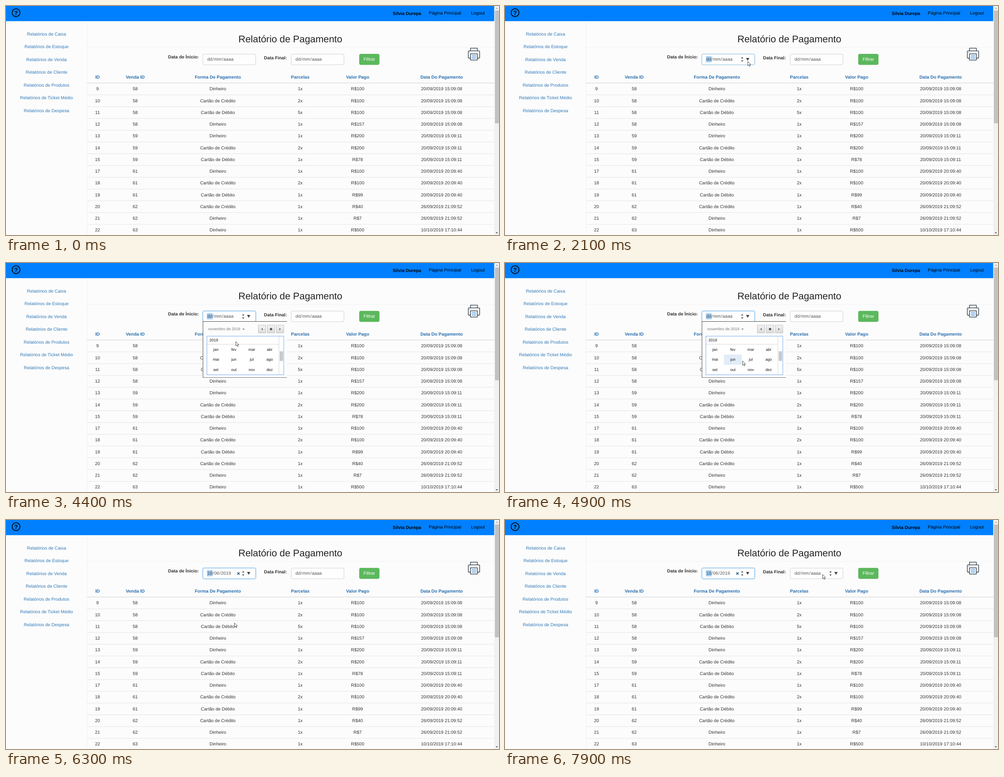
Recreate the animation shown at these times as an HTML page. Size 1095 by 511 pixels, loop 8 s.

```html
<!DOCTYPE html>
<html lang="pt-BR">
<head>
<meta charset="utf-8">
<title>Relatório de Pagamento</title>
<style>
  html, body { margin: 0; width: 100%; height: 100%; overflow: hidden; background: #fcfcfc; }
  svg { display: block; width: 1095px; height: 511px; }
  text { font: 9.98px "Liberation Sans", Arial, sans-serif; fill: #333; text-rendering: geometricPrecision; white-space: pre; }
  .mid { text-anchor: middle; }
  .bold { font-weight: bold; }
  .link { fill: #337ab7; }
  .head { fill: #2a6fb0; font-weight: bold; }
  .black { fill: #000; }
  .title { font-size: 21.4px; fill: #222; }
  .field { fill: #555; }
  .small { font-size: 8.56px; fill: #111; }
  .dim { fill: #b8b8b8; }
  .gray { fill: #777; }
  .input { fill: #fefefe; stroke: #ccc; stroke-width: .9; }
</style>
</head>
<body>
<svg viewBox="0 0 1095 511">
  <defs>
    <linearGradient id="button" x2="0" y2="1">
      <stop stop-color="#f4f4f4"/><stop offset="1" stop-color="#dadada"/>
    </linearGradient>
  </defs>
  <g id="page"></g>
  <g id="fields"></g>
  <g id="popup"></g>
  <path id="cursor" d="M0 0V9.4L2.2 7.4L3.8 10.9L5.3 10.2L3.8 6.9H6.7Z" fill="#fff" stroke="#222" stroke-width=".8"/>
</svg>
<script>
const LOOP = 8000, STEP = 100;
const $ = id => document.getElementById(id);
const text = (x, y, s, cls = '') => `<text x="${x}" y="${y}" class="${cls}">${s}</text>`;
const rect = (x, y, w, h, fill, extra = '') => `<rect x="${x}" y="${y}" width="${w}" height="${h}" fill="${fill}" ${extra}/>`;
const path = (d, fill, extra = '') => `<path d="${d}" fill="${fill}" ${extra}/>`;
const line = (d, color, width = .8) => path(d, 'none', `stroke="${color}" stroke-width="${width}"`);
const frame = (x, y, w, h, color) => rect(x, y, w, h, 'none', `stroke="${color}" stroke-width=".9"`);

// Static page
const columns = [203.3, 287, 470.5, 653.5, 781, 967.5];
const headings = ['ID', 'Venda ID', 'Forma De Pagamento', 'Parcelas', 'Valor Pago', 'Data Do Pagamento'];
const methods = { D: 'Dinheiro', C: 'Cartão de Crédito', B: 'Cartão de Débito' };
const sales = {
  58: '20/09/2019 15:09:08', 59: '20/09/2019 15:09:11', 61: '20/09/2019 20:09:40',
  62: '26/09/2019 21:09:52', 63: '10/10/2019 17:10:44'
};
const payments = `9 58 D 1 100|10 58 C 2 100|11 58 B 5 100|12 58 D 1 157|13 59 D 1 200|14 59 C 2 200|15 59 B 1 78
|17 61 D 1 100|18 61 C 2 100|19 61 B 1 99|20 62 C 1 40|21 62 D 1 7|22 63 D 1 500`.split('|');
const reports = ['Caixa', 'Estoque', 'Venda', 'Cliente', 'Produtos', 'Ticket Médio', 'Despesa'];

function printer() {
  const ink = 'stroke="#26323d" stroke-width="1.3" stroke-linejoin="round"';
  return rect(1031.6, 94.1, 15.3, 8, '#fcfcfc', ink) +
    rect(1026.8, 100.2, 25.2, 16.3, '#fcfcfc', ink + ' rx="2"') +
    rect(1031.6, 106.6, 15.3, 14, '#fcfcfc', ink) +
    line('M1034.5 110.3h9.8M1034.5 113.6h9.8M1034.5 116.9h9.8', '#3c8fe0', 1.3) +
    line('M1029 103.5h2.2', '#3c8fe0', 1.2);
}

function page() {
  let out = rect(0, 0, 1084.6, 33.8, '#0080ff') +
    '<circle cx="22.3" cy="14.9" r="8.8" fill="none" stroke="#000" stroke-width="1.7"/>' +
    `<text x="22.3" y="19.6" class="mid bold black" style="font-size:13px">?</text>` +
    text(859, 20, 'Silvia Durepa', 'bold black') +
    text(939, 19, 'Página Principal', 'black') + text(1033, 19, 'Logout', 'black') +
    line('M180 34V511', '#eee') + line('M180 92H1085', '#eee');
  reports.forEach((r, i) => out += text(90, 65.6 + i * 28.57, 'Relatórios de ' + r, 'mid link'));
  out += text(631.6, 81, 'Relatório de Pagamento', 'mid title') +
    text(360, 117.3, 'Data de Ínicio:', 'bold') + text(573, 118.6, 'Data Final:', 'bold') +
    rect(785, 107.3, 44, 23.6, '#5cb85c', 'rx="2.8" stroke="#4cae4c" stroke-width=".8"') +
    '<text x="807" y="122.3" class="mid" style="fill:#fff">Filtrar</text>' + printer();
  headings.forEach((h, i) => out += text(columns[i], 161.6, h, 'mid head'));
  out += line('M180 171.7H1085', '#ddd', 1.4);
  payments.forEach((p, row) => {
    const [id, sale, method, parts, value] = p.trim().split(' ');
    const y = 188.4 + row * 26.25;
    [id, sale, methods[method], parts + 'x', 'R$' + value, sales[sale]]
      .forEach((s, i) => out += text(columns[i], y, s, 'mid'));
    out += line(`M180 ${y + 10}H1085`, '#ddd');
  });
  return out + rect(1084.6, 0, 10.4, 511, '#f1f1f1') + rect(1086, 10, 8.8, 251.6, '#c1c1c1') +
    path('M1087.6 6.2h5l-2.5-2.7z', '#a3a3a3') + path('M1087.6 505h5l-2.5 2.7z', '#505050');
}

// Date inputs
function dateInput(x, value, focus, controls) {
  const glow = focus ? ` style="stroke:rgb(${204 - 102 * focus},${204 - 29 * focus},${204 + 29 * focus});` +
    `filter:drop-shadow(0 0 1.8px rgba(102,175,233,${.6 * focus}))"` : '';
  let out = `<rect x="${x}" y="107.3" width="117.3" height="23.7" rx="2.8" class="input"${glow}/>`;
  if (focus) out += rect(x + 8.9, 112.3, 12.7, 13.2, '#9fcbf3');
  out += `<text x="${x + 9.7}" y="122.3" dx="0 0 .7 .7 0 .7 .7" class="field">${value}</text>`;
  if (controls) out += path(`M${x + 87} 117h5.2l-2.6-3zM${x + 87} 121.4h5.2l-2.6 3z`, '#444') +
    path(`M${x + 98} 116h7.4l-3.7 6.3z`, '#444');
  if (value[0] == '1') out += line(`M${x + 76.4} 116.7l5.2 5.2m0-5.2l-5.2 5.2`, '#1d5a86', 1.5);
  return out;
}

// Calendar popup
const weekdays = ['dom', 'seg', 'ter', 'qua', 'qui', 'sex', 'sáb'];
const months = ['jan', 'fev', 'mar', 'abr', 'mai', 'jun', 'jul', 'ago', 'set', 'out', 'nov', 'dez'];
const DAY = { x: 446.4, y: 181.3, w: 24.28, h: 14.25, cols: 7 };
const MONTH = { x: 446.4, y: 181.5, w: 39.8, h: 22.8, cols: 4 };
const cellAt = (g, i) => [g.x + i % g.cols * g.w, g.y + Math.floor(i / g.cols) * g.h];
function hitCell(g, count, x, y) {
  const col = Math.floor((x - g.x) / g.w), row = Math.floor((y - g.y) / g.h);
  const i = row * g.cols + col;
  return col < 0 || col >= g.cols || row < 0 || i >= count ? -1 : i;
}
function cells(grid, list, hover) {
  return list.map(([label, cls], i) => {
    const [x, y] = cellAt(grid, i);
    return (i == hover ? rect(x, y, grid.w, grid.h, '#e2ecf8') : '') +
      text(x + grid.w / 2, y + grid.h / 2 + 2.7, label, 'mid small ' + cls);
  }).join('');
}
function monthDays(offset, previous, length, rows) {
  return Array.from({ length: rows * 7 }, (_, i) => {
    const d = i - offset + 1;
    return d < 1 ? [d + previous, 'dim'] : d > length ? [d - length, 'dim'] : [d, ''];
  });
}
const views = {
  november: { title: 'novembro de 2019', bottom: 261, arrow: 525, box: 90, edge: '#6a9ff0', days: monthDays(5, 31, 30, 5) },
  months: { title: 'novembro de 2019', bottom: 256, arrow: 525, box: 86.3, edge: '#6a9ff0' },
  june: { title: 'junho de 2019', bottom: 275, arrow: 507.6, box: 104.3, edge: '#bbb', days: monthDays(6, 31, 30, 6) }
};
function popup(name, x, y) {
  const v = views[name];
  if (!v) return '';
  const picking = name == 'months', first = name == 'november';
  const border = first ? '#999' : '#222';
  let out = rect(437, 130.5, 187.2, v.bottom - 130.5, '#fcfcfc') + line(`M437.5 131V${v.bottom}`, border);
  if (!first) out += line('M437 130.5H624', border);
  if (picking) out += line('M437 255.5H624', '#555');
  out += text(449, 150.2, v.title, 'small ' + (picking ? 'gray' : '')) +
    path(`M${v.arrow} 146.4h5l-2.5 3z`, picking ? '#777' : '#111');
  for (const bx of [560.4, 580.4, 600.4])
    out += rect(bx, 138.8, 16.6, 17.2, 'url(#button)', 'stroke="#b5b5b5" stroke-width=".8"');
  out += path('M570 145.2v4.8l-2.7-2.4zM607.3 145.2v4.8l2.7-2.4z', '#444') +
    '<circle cx="588.7" cy="147.4" r="2.6" fill="#555"/>' +
    rect(446.2, 163.2, 170.8, v.box, '#fff');
  if (picking) {
    out += text(452, 175.2, '2019', 'small') +
      cells(MONTH, months.map(m => [m, '']), hitCell(MONTH, 12, x - 2, y)) +
      line('M446 181.3H606M606.3 163V250', '#ccc') + rect(608, 197, 7.4, 21.5, '#c8c8c8');
  } else {
    weekdays.forEach((d, i) => out += text(458.5 + i * DAY.w, 175.4, d, 'mid small'));
    out += line('M446 181.3H617', '#ccc') + cells(DAY, v.days, hitCell(DAY, v.days.length, x - 2, y));
    if (first) out += frame(471, 195.6, 24, 14.2, '#bbb');
  }
  return out + frame(446.2, 163.2, 170.8, v.box, v.edge);
}

// Pointer path: time, x, y
const track = [
  [500, 54, 9], [800, 440, 68], [1000, 651, 92], [1100, 615, 115], [1300, 545, 129],
  [1600, 515, 125], [2000, 538, 124], [2100, 539.3, 123.7], [2200, 535, 125],
  [2300, 518, 136], [2400, 497, 143], [2500, 533, 126], [2600, 533, 126], [2900, 539, 118],
  [3000, 539, 118], [3200, 535, 135], [3400, 507.5, 162.7], [3600, 497, 152], [3900, 495, 147],
  [4100, 497, 147], [4500, 515, 185], [4800, 540, 235], [4900, 527.6, 218.7], [5000, 510, 190],
  [5100, 506, 213], [5300, 506, 213], [5600, 504.6, 221.7], [6100, 506, 230], [6200, 506, 230],
  [6500, 510, 229], [6600, 510, 229], [6800, 629.2, 221.2], [7000, 685, 170], [7200, 718, 128],
  [7400, 721, 122], [7500, 721, 122], [7600, 719, 123], [7700, 721, 122], [7800, 721, 122], [7900, 705.5, 121.7]
];
function pointer(t) {
  const i = track.findIndex(k => k[0] > t);
  if (i < 0) return track[track.length - 1].slice(1);
  const [t0, x0, y0] = track[i - 1], [t1, x1, y1] = track[i];
  const p = (t - t0) / (t1 - t0);
  return [x0 + (x1 - x0) * p, y0 + (y1 - y0) * p];
}
const viewAt = t => t < 3100 || t >= 6200 ? '' : t < 4100 ? 'november' : t < 5300 ? 'months' : 'june';

function draw(t) {
  const visible = t >= 500;
  const [x, y] = visible ? pointer(t) : [-20, -20];
  const over = left => x > left && x < left + 117 && y > 107 && y < 131;
  const focus = t < 2100 ? 0 : t < 2200 ? .6 : 1;
  const empty = 'dd/mm/aaaa';
  $('fields').innerHTML =
    dateInput(437.3, t < 6200 ? empty : '18/06/2019', focus, focus || over(437.3)) +
    dateInput(633.4, empty, 0, over(633.4));
  $('popup').innerHTML = popup(viewAt(t), x, y);
  $('cursor').setAttribute('transform', `translate(${x} ${y})`);
}

$('page').innerHTML = page();
const start = performance.now();
let last = -1;
function tick() {
  const t = Math.floor((performance.now() - start) % LOOP / STEP) * STEP;
  if (t !== last) draw(last = t);
  requestAnimationFrame(tick);
}
tick();
</script>
</body>
</html>
```
